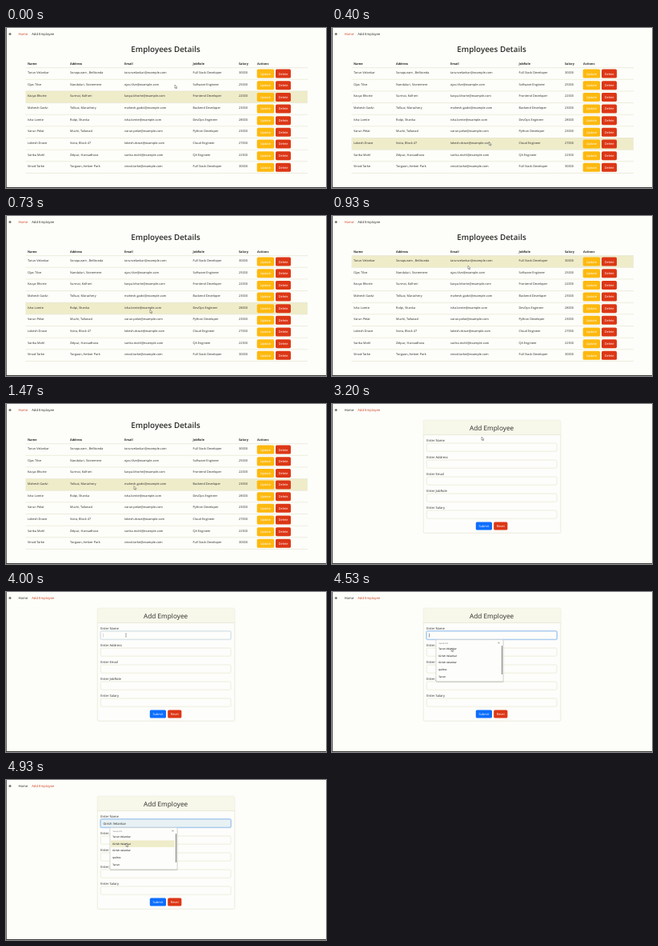
These frames come from a looping animation (400 by 200 pixels, 5000 ms). An HTML page:

```html
<!DOCTYPE html>
<html lang="en">
<head>
<meta charset="utf-8">
<title>Employees Details</title>
<style>
  html, body { margin: 0; width: 100%; height: 100%; overflow: hidden; background: #fdfdfa; }
  svg { display: block; width: 400px; height: 200px; }
  text { font-family: "Open Sans", "Noto Sans", sans-serif; fill: #2b2b28; text-rendering: geometricPrecision; }
  .mid { text-anchor: middle; }
  .cell { font-size: 3.85px; }
  .head { font-size: 3.85px; font-weight: 700; }
  .nav { font-size: 4.2px; }
  .nav.on { fill: #cf4522; }
  .title { font-size: 9.9px; font-weight: 600; }
  .card-title { font-size: 8.25px; }
  .label { font-size: 4.1px; }
  .btn { font-size: 3.9px; fill: #fff; }
  .item { font-size: 3.1px; font-weight: 600; }
  .hint { font-size: 2.4px; fill: #666; }
  .line { stroke: #e6e6cf; stroke-width: .7; fill: none; }
  .field { fill: #fdfdfb; stroke: #e6e6cf; stroke-width: .7; }
  .hover { fill: #efecca; }
</style>
</head>
<body>
<svg id="stage" viewBox="0 0 400 200"></svg>
<script>
const NS = "http://www.w3.org/2000/svg";
const stage = document.getElementById("stage");
const LOOP = 5000, TICKS = 75;
const YELLOW = "#fdb90f", RED = "#dc3716", BLUE = "#0d6efd";
const ROW_TOP = 49.6, ROW_H = 14.65;

function add(parent, tag, attrs, content) {
  const el = document.createElementNS(NS, tag);
  for (const key in attrs) el.setAttribute(key, attrs[key]);
  if (content) el.textContent = content;
  return parent.appendChild(el);
}
const group = (parent = stage) => add(parent, "g", {});
const text = (parent, cls, x, y, str) => add(parent, "text", { class: cls, x, y }, str);
const box = (parent, x, y, width, height, attrs) =>
  add(parent, "rect", { x, y, width, height, ...attrs });
const line = (parent, y, x1, x2) => add(parent, "path", { class: "line", d: `M${x1} ${y}H${x2}` });
function button(parent, x, y, w, h, fill, str) {
  box(parent, x, y, w, h, { rx: 1.6, fill });
  text(parent, "btn mid", x + w / 2, y + h / 2 + 1.4, str);
}
const show = (el, on) => el.setAttribute("visibility", on ? "visible" : "hidden");

// Navigation
add(stage, "circle", { cx: 5, cy: 7.6, r: 1.5, fill: "#77776f" });
const homeLink = text(stage, "nav", 15.4, 8.5, "Home");
const addLink = text(stage, "nav", 32.2, 8.5, "Add Employee");

// Employee table
const table = group();
const rowHover = box(table, 24.5, 0, 352.5, ROW_H, { class: "hover" });
text(table, "title mid", 199.5, 30, "Employees Details");
const columns = [27, 80, 148, 233.5, 291, 314];
["Name", "Address", "Email", "JobRole", "Salary", "Actions"]
  .forEach((str, i) => text(table, "head", columns[i], 45.8, str));
line(table, ROW_TOP, 24.5, 377);
const staff = [
  ["Tarun Velankar", "Sonapuram , Belikonda", "Full Stack Developer", 30000],
  ["Ojas Tilve", "Nandaluri, Stonemere", "Software Engineer", 25000],
  ["Kavya Bhorte", "Surmai, Kolheri", "Frontend Developer", 22000],
  ["Mahesh Gadvi", "Tolluai, Marachery", "Backend Developer", 23000],
  ["Isha Lomte", "Rolpi, Shanka", "DevOps Engineer", 28000],
  ["Varun Pelat", "Muchi, Tallanad", "Python Developer", 23000],
  ["Lokesh Drave", "Voira, Block 47", "Cloud Engineer", 27000],
  ["Sarika Mohl", "Zelpur, Hansadhara", "QA Engineer", 22500],
  ["Vinod Tarke", "Torgaon, Amber Park", "Full Stack Developer", 30000],
];
staff.forEach(([name, place, role, pay], i) => {
  const top = ROW_TOP + i * ROW_H;
  const mail = name.toLowerCase().replace(" ", i ? "." : "") + "@example.com";
  [name, place, mail, role, String(pay)]
    .forEach((str, c) => text(table, "cell", columns[c], top + 7.5, str));
  button(table, 313.7, top + 2, 21.4, 11, YELLOW, "Update");
  button(table, 337, top + 2, 19, 11, RED, "Delete");
  line(table, top + ROW_H, 24.5, 377);
});

// Employee form
const form = group();
box(form, 114.3, 20.3, 171.5, 141, { class: "field", rx: 1.5 });
box(form, 114.6, 20.6, 170.9, 17.8, { fill: "#f7f7ea" });
line(form, 38.5, 114.3, 285.8);
text(form, "card-title mid", 199.6, 32.8, "Add Employee");
const fields = ["Name", "Address", "Email", "JobRole", "Salary"].map((str, i) => {
  text(form, "label", 118.2, 47.4 + i * 21, "Enter " + str);
  return box(form, 118.3, 49 + i * 21, 162.7, 10.2, { class: "field", rx: 1.4 });
});
button(form, 179.8, 147.5, 20.2, 10, BLUE, "Submit");
button(form, 202.2, 147.5, 17.2, 10, RED, "Reset");

const focus = group(form);
box(focus, 117.8, 48.5, 163.7, 11.2, { rx: 1.9, fill: "none", stroke: "#c2daf7", "stroke-width": 1.2 });
const input = box(focus, 118.3, 49, 162.7, 10.2, { rx: 1.4, stroke: "#86b7e4", "stroke-width": .7 });
const caret = box(focus, 121.3, 51.6, .5, 5, { fill: "#333" });
const typed = text(focus, "label", 121.4, 55.7, "");

// Autofill list
const list = group(form);
box(list, 129.8, 60.3, 84.8, 53, { rx: 1.5, fill: "#000", opacity: .12 });
box(list, 130, 59.6, 84, 52.2, { rx: 1.2, fill: "#fdfdfb", stroke: "#bdbdb5", "stroke-width": .5 });
const itemHover = box(list, 131, 0, 80, 8.4, { class: "hover" });
text(list, "hint", 133.5, 65, "Saved info");
add(list, "path", { d: "M207.7 62.7l1.7 1.7m0-1.7l-1.7 1.7", stroke: "#444", "stroke-width": .45 });
box(list, 212, 67, 1.1, 36, { rx: .5, fill: "#85857e" });
const saved = ["Tarun Velankar", "Girish Velankar", "Girish velankar", "quiltos", "Tarun"];
saved.forEach((str, i) => text(list, "item", 133.3, 72.2 + i * 8.6, str));

// Window edge
box(stage, 0, 0, .9, 200, { fill: "#55554d" });
box(stage, 0, 199, 400, 1, { fill: "#3c3c36" });

// Pointers
const arrow = add(stage, "path", {
  d: "M0 0V4.3L1 3.4L1.7 4.9L2.4 4.6L1.7 3.1H3Z", fill: "#fff", stroke: "#333", "stroke-width": .4,
});
const beam = add(stage, "path", {
  d: "M-.8-2H.8M0-2V2M-.8 2H.8", stroke: "#444", "stroke-width": .4, fill: "none",
});

// [tick, x, y]
const path = [
  [0, 211, 71], [1, 210, 74], [2, 209, 83], [8, 190, 172], [14, 170, 62], [18, 170, 62],
  [26, 150, 143], [30, 80, 40], [32, 80, 40], [35, 37, 7], [40, 37, 7], [44, 120, 26],
  [48, 187, 41], [52, 190, 84], [56, 150, 54], [67, 150, 54], [68, 149, 70],
  [69, 150, 78], [71, 150, 87], [73, 150, 87], [74, 150, 79],
];
// [tick, row]; 0 means no row
const rowSteps = [
  [0, 3], [1, 2], [2, 3], [3, 4], [4, 5], [5, 6], [6, 7], [7, 8], [8, 9], [9, 8], [10, 7],
  [11, 5], [12, 4], [13, 2], [14, 1], [20, 2], [21, 3], [22, 4], [23, 5], [25, 6], [26, 7],
  [27, 5], [28, 3], [29, 1], [30, 0],
];
const itemSteps = [[0, 0], [69, 1], [70, 2], [71, 3], [74, 2]];

const stepAt = (steps, n) => steps.reduce((value, [at, v]) => (n >= at ? v : value), 0);

function pointAt(n) {
  const i = path.findIndex(p => p[0] >= n);
  if (i < 1) return path[0].slice(1);
  const [a, ax, ay] = path[i - 1], [b, bx, by] = path[i];
  const k = (n - a) / (b - a);
  return [ax + (bx - ax) * k, ay + (by - ay) * k];
}

function draw(n) {
  const onForm = n >= 39;
  table.style.display = onForm ? "none" : "";
  form.style.display = onForm ? "" : "none";
  homeLink.classList.toggle("on", !onForm);
  addLink.classList.toggle("on", onForm);

  const row = stepAt(rowSteps, n);
  show(rowHover, row);
  rowHover.setAttribute("y", ROW_TOP + (row - 1) * ROW_H);

  const item = stepAt(itemSteps, n);
  focus.setAttribute("opacity", Math.max(0, Math.min(1, (n - 59) / 3)));
  show(list, n >= 63);
  itemHover.style.display = item ? "" : "none";
  itemHover.setAttribute("y", 66.9 + (item - 1) * 8.6);
  input.setAttribute("fill", item ? "#e8f1f4" : "#fdfdfb");
  typed.textContent = item ? saved[item - 1] : "";
  show(caret, !item);

  const [x, y] = pointAt(n);
  const inField = n >= 57 && n < 68;
  show(arrow, !inField);
  show(beam, inField);
  (inField ? beam : arrow).setAttribute("transform", `translate(${x} ${y})`);
}

const start = performance.now();
function frame() {
  const t = (performance.now() - start) % LOOP;
  draw(Math.floor((t + 4) * TICKS / LOOP) % TICKS);
  requestAnimationFrame(frame);
}
frame();
</script>
</body>
</html>
```
